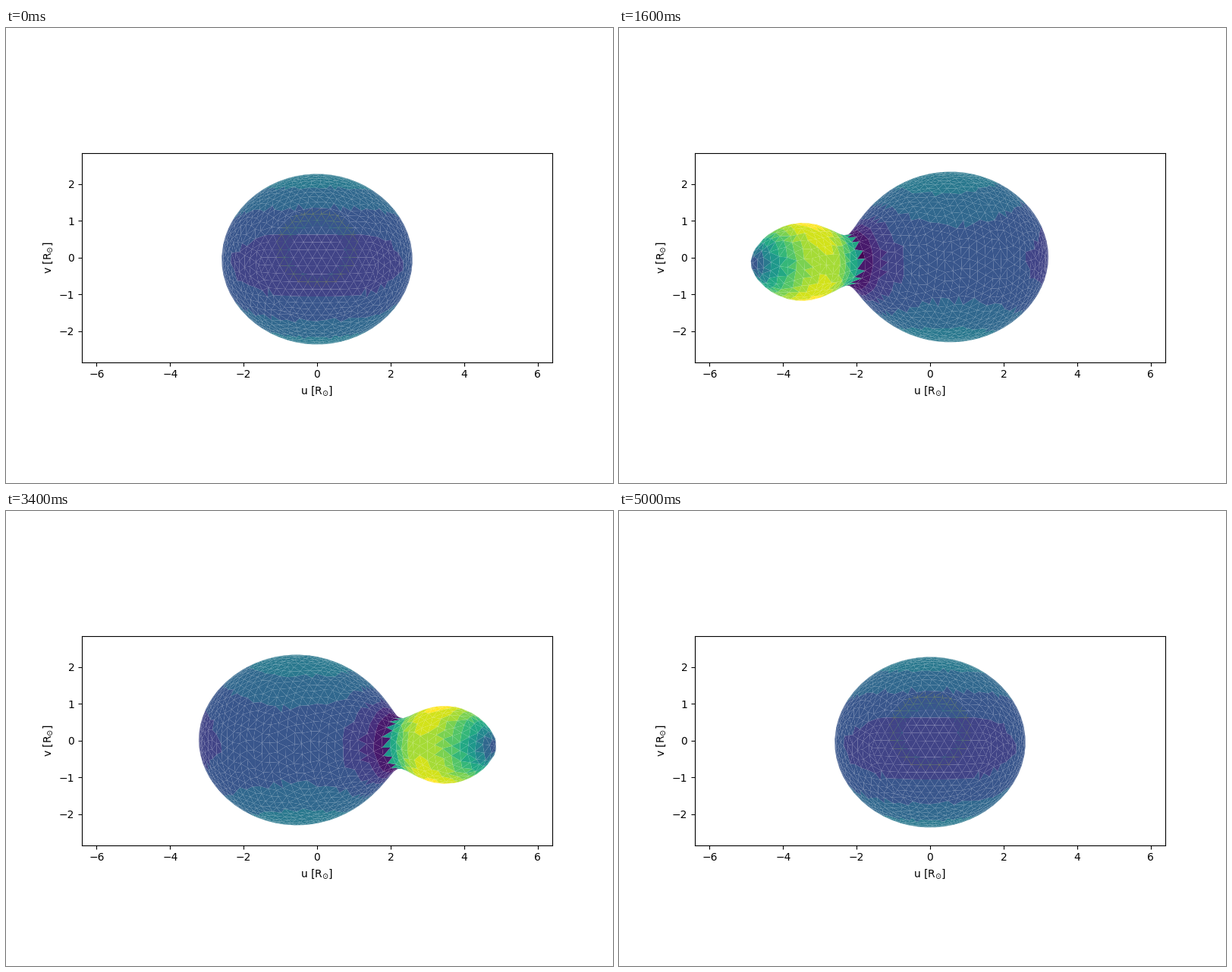
Animation of 800x600 px, one loop 5.1 s. Source, as a matplotlib script:

```python
import numpy as np
import matplotlib.pyplot as plt
from matplotlib.animation import FuncAnimation
from matplotlib.collections import PolyCollection

FRAMES = 51
Q = 0.15              # mass ratio
LEVEL = 2.014         # surface potential
SEP = 4.365           # separation in solar radii
INCL = np.radians(86)
NECK = 0.69           # where the two stars meet, in separations
HEAT = 1.52           # temperature scale of the small star
COOL, HOT = 0.925, 2.0   # temperatures at the ends of the colour map
EDGE = 0.0589         # triangle edge, in separations
HEX_RINGS = 7

rng = np.random.default_rng(4)


def potential(x, y, z):
    r1 = np.sqrt(x**2 + y**2 + z**2)
    r2 = np.sqrt((x - 1)**2 + y**2 + z**2)
    return 1 / r1 + Q * (1 / r2 - x) + (1 + Q) / 2 * (x**2 + y**2)


def gradient(p):
    x, y, z = p.T
    c1 = (x**2 + y**2 + z**2) ** -1.5
    c2 = Q * ((x - 1)**2 + y**2 + z**2) ** -1.5
    gx = -x * c1 - (x - 1) * c2 - Q + (1 + Q) * x
    gy = y * (1 + Q - c1 - c2)
    gz = -z * (c1 + c2)
    return np.column_stack([gx, gy, gz])


def bisect(f, inner, outer):
    for _ in range(40):
        mid = (inner + outer) / 2
        inside = f(mid) > LEVEL
        inner = np.where(inside, mid, inner)
        outer = np.where(inside, outer, mid)
    return (inner + outer) / 2


def radius(x, phi):
    """Distance of the surface from the long axis."""
    c, s = np.cos(phi), np.sin(phi)
    zero = np.zeros(np.broadcast(x, phi).shape)
    return bisect(lambda r: potential(x, r * c, r * s), zero, zero + 0.64)


def hexagon(k):
    """Points along a hexagon with k steps per side, as complex numbers."""
    side, step = np.divmod(np.arange(6 * k), k)
    t = step / k
    return ((1 - t) * np.exp(1j * np.pi / 3 * side)
            + t * np.exp(1j * np.pi / 3 * (side + 1)))


def zip_rings(a, b, phi):
    """Triangles between two rings of vertex indices."""
    def mid(ring, i):
        n = len(ring)
        ahead = phi[ring[(i + 1) % n]] + 2 * np.pi * ((i + 1) // n)
        return (phi[ring[i]] + ahead) / 2

    na, nb = [len(r) if len(r) > 1 else 0 for r in (a, b)]
    tris, i, j = [], 0, 0
    while i < na or j < nb:
        if j >= nb or (i < na and mid(a, i) < mid(b, j)):
            tris.append((a[i], a[(i + 1) % na], b[j % len(b)]))
            i += 1
        else:
            tris.append((b[j], b[(j + 1) % nb], a[i % len(a)]))
            j += 1
    return tris


def build_mesh():
    # Meridians from the back of the large star to the tip of the small one
    back = bisect(lambda x: potential(x, 0, 0), -0.3, -0.75)
    tip = bisect(lambda x: potential(x, 0, 0), 1.2, 1.39)
    xs = (back + tip) / 2 - (tip - back) / 2 * np.cos(np.linspace(0, np.pi, 400))
    grid = np.radians(np.arange(360))[:, None]
    rho = radius(xs[None, :], grid)
    rho[:, [0, -1]] = 0
    arc = np.cumsum(np.hypot(np.diff(xs), np.diff(rho, axis=1)), axis=1)
    arc = np.hstack([np.zeros((360, 1)), arc])
    length = arc[:, -1].mean()
    frac = arc / arc[:, -1:]
    mean_frac, mean_rho = frac.mean(axis=0), rho.mean(axis=0)

    count = int(round(length / (0.866 * EDGE)))
    phi, sigma, level, rings = [], [], [], []
    for k in range(count + 1):
        if k in (0, count):
            angle, pos = np.zeros(1), np.full(1, float(k))
        elif k <= HEX_RINGS:
            z = hexagon(k)
            angle = np.angle(z) % (2 * np.pi)
            blend = np.clip((10 - k) / 6, 0, 1)
            pos = k * (1 + (np.abs(z) / 0.866 - 1) * blend)
        else:
            around = 2 * np.pi * np.interp(k / count, mean_frac, mean_rho)
            n = max(5, int(round(around / EDGE)))
            wobble = rng.uniform(-0.12, 0.12, n)
            angle = 2 * np.pi * (np.arange(n) + rng.random() + wobble) / n
            pos = k + rng.uniform(-0.1, 0.1, n)
        rings.append(np.arange(len(phi), len(phi) + len(angle)))
        phi.extend(angle)
        sigma.extend(pos / count)
        level.extend([k] * len(angle))

    phi, sigma, level = np.array(phi), np.array(sigma), np.array(level)
    column = np.round(np.degrees(phi)).astype(int) % 360
    x = np.array([np.interp(s, frac[c], xs) for s, c in zip(sigma, column)])
    r = radius(x, phi)
    points = np.column_stack([x, r * np.cos(phi), r * np.sin(phi)])

    tris = np.array([t for a, b in zip(rings, rings[1:])
                     for t in zip_rings(a, b, phi)])
    ring_x = np.array([x[ring].mean() for ring in rings])
    split = np.searchsorted(ring_x, NECK) - 0.5
    small = level[tris].mean(axis=1) > split
    return points, tris, small


points, tris, small = build_mesh()
slope = gradient(points)

# Gravity darkening, each star with its own scale
temp = (np.linalg.norm(slope, axis=1) ** 0.25)[tris].mean(axis=1)
temp = np.where(small, HEAT, 1) * temp
colors = plt.get_cmap("viridis", 16)((temp - COOL) / (HOT - COOL))

corners = points[tris]
normals = np.cross(corners[:, 1] - corners[:, 0], corners[:, 2] - corners[:, 0])
outward = -slope[tris].mean(axis=1)
normals *= np.sign((normals * outward).sum(axis=1))[:, None]
corners = (corners - [Q / (1 + Q), 0, 0]) * SEP

fig, ax = plt.subplots(figsize=(8, 6), dpi=100)
ax.set_aspect("equal")
ax.set_xlim(-6.4, 6.4)
ax.set_ylim(-2.848, 2.84)
ax.set_xticks(range(-6, 7, 2))
ax.set_yticks(range(-2, 3))
ax.set_xlabel(r"u [$\mathrm{R_{\odot}}$]")
ax.set_ylabel(r"v [$\mathrm{R_{\odot}}$]")

# Antialiased faces without outlines leave fine light seams
surface = PolyCollection([], edgecolors="none", linewidths=0)
ax.add_collection(surface, autolim=False)


def view(theta):
    """Rows: right, up and towards the viewer."""
    s, c = np.sin(theta), np.cos(theta)
    si, ci = np.sin(INCL), np.cos(INCL)
    return np.array([[-s, c, 0],
                     [c * ci, s * ci, si],
                     [-c * si, -s * si, ci]])


def update(frame):
    rot = view(2 * np.pi * frame / (FRAMES - 1))
    front = np.flatnonzero(normals @ rot[2] > 0)
    seen = corners[front] @ rot.T
    order = np.argsort(seen[:, :, 2].mean(axis=1))
    surface.set_verts(seen[order, :, :2])
    surface.set_facecolor(colors[front[order]])
    return (surface,)


anim = FuncAnimation(fig, update, frames=FRAMES, interval=100,
                     repeat=True, repeat_delay=0)
plt.show()
```
